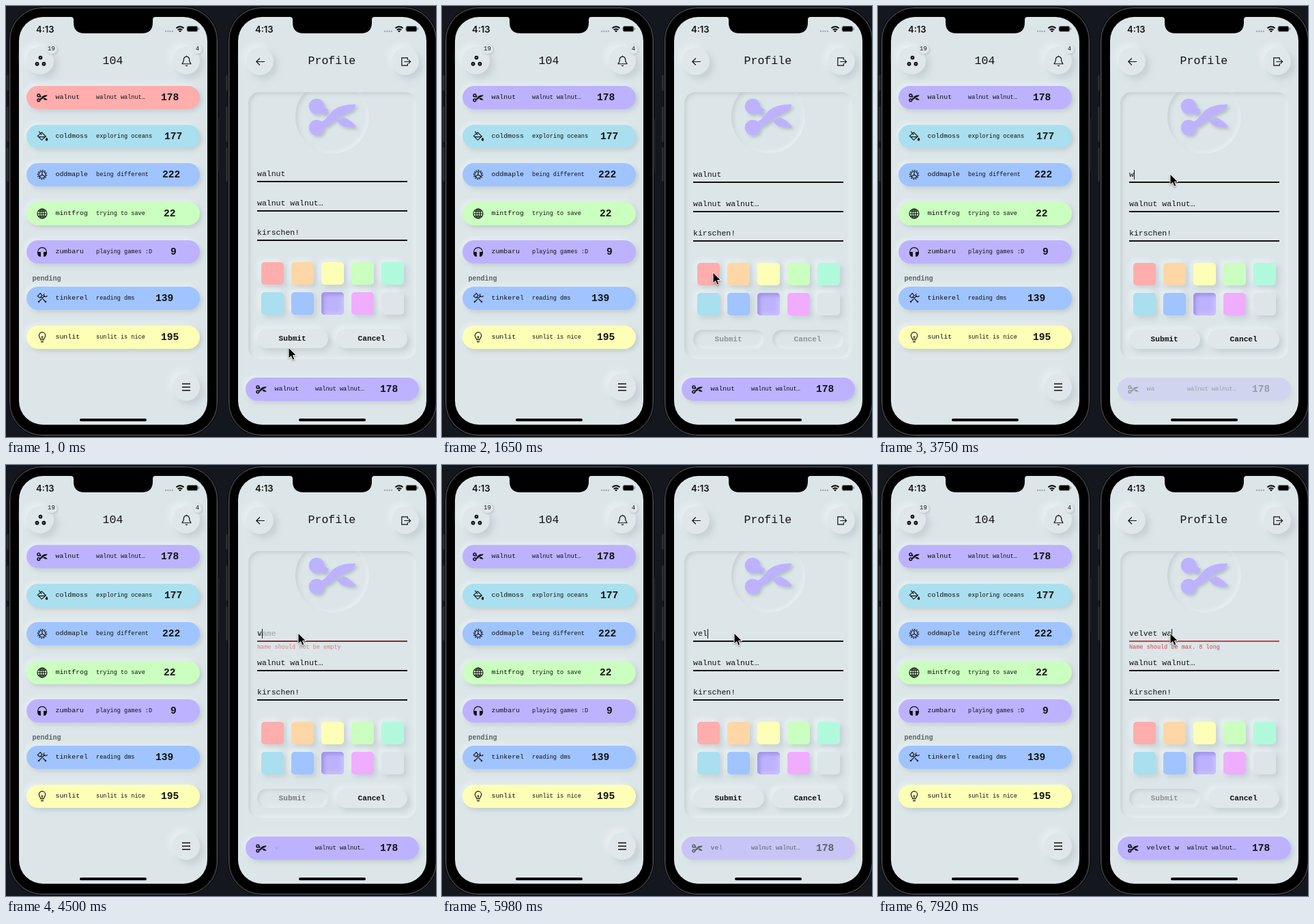
These frames come from a looping animation (630x631 px, 8 s). An HTML page:

```html
<!DOCTYPE html>
<html lang="en">
<head>
<meta charset="utf-8">
<style>
html, body { margin: 0; width: 100%; height: 100%; overflow: hidden; background: #15171e; }
div, svg { position: absolute; box-sizing: border-box; }
svg { overflow: visible; }
#stage { width: 630px; height: 631px; overflow: hidden; color: #111; font-family: "Liberation Mono", monospace; }
.text { line-height: 20px; white-space: pre; }
.raised { background: #dfe7ea; box-shadow: 4px 4px 7px #bac6caaa, -4px -4px 7px #e9f0f2; }
.round { border-radius: 50%; background: #dfe7ea; box-shadow: 6px 6px 9px #bcc8ccaa, -6px -6px 9px #e7eef0; }
.sunk { box-shadow: inset 3px 3px 5px #c0cbcfbb, inset -3px -3px 5px #e8eff1; }
.pill { box-shadow: 3px 3px 6px #b3c0c5aa, -3px -3px 6px #e9f0f2; }
.group { left: 0; top: 0; }
</style>
</head>
<body>
<div id="stage"></div>
<script>
const stage = document.getElementById('stage');
const SURFACE = '#dce5e8', LILAC = [189, 178, 255], ROSE = [255, 173, 173];
const LOOP = 8000, RIGHT = 321;
const rgb = c => `rgb(${c})`;

function box(parent, x, y, w, h, css = '', cls = '') {
  const e = document.createElement('div');
  e.className = cls;
  e.style.cssText = `left:${x}px;top:${y}px;width:${w}px;height:${h}px;${css}`;
  parent.append(e);
  return e;
}

function text(parent, str, x, y, size, css = '') {
  const e = document.createElement('div');
  e.className = 'text';
  e.style.cssText = `left:${x}px;top:${y - 10}px;font-size:${size}px;${css}`;
  e.textContent = str;
  parent.append(e);
  return e;
}

function svg(parent, x, y, w, h, view, body, css = '') {
  parent.insertAdjacentHTML('beforeend',
    `<svg viewBox="${view}" style="left:${x}px;top:${y}px;width:${w}px;height:${h}px;${css}">${body}</svg>`);
  return parent.lastChild;
}

function group(parent) {
  const e = document.createElement('div');
  e.className = 'group';
  parent.append(e);
  return e;
}

const blades = `<path d="M19 36C26 33 30 27 35 21 42 13 56 10 70 10 70 17 62 21 54 24 46 28 42 32 37 36 32 40 26 43 20 44Z
  M20 12 31 18 26 26 17 22ZM42 34 53 29C60 32 67 37 71 43 62 45 54 43 48 40Z"/>`;
const handles = attrs => [13, 44].map(y => `<circle cx="13" cy="${y}" ${attrs}/>`).join('');

const icons = {
  back: '<path d="M21 12H4m7-7-7 7 7 7"/>',
  exit: '<path d="M16 8V4H4v16h12v-4M9 12h13m-4-4 4 4-4 4"/>',
  bell: '<path d="M12 3C7 3 6 7 6 11 6 15 3 16 3 18H21C21 16 18 15 18 11 18 7 17 3 12 3ZM12 1v2M10 21q2 2 4 0"/>',
  menu: '<path stroke-width="2.2" d="M3 5h18M3 12h18M3 19h18"/>',
  dots: '<g stroke-width="3"><circle cx="12" cy="5" r="2.6"/><circle cx="5" cy="18" r="2.6"/><circle cx="19" cy="18" r="2.6"/></g>',
  bucket: '<path d="M2 11 11 3 20 12 11 20ZM5 1l6 8M4 13h15"/><path fill="#111" d="M22 15q-4 5 0 6 3-1 0-6"/>',
  gear: '<circle cx="12" cy="12" r="7.5"/><circle cx="12" cy="12" r="10" stroke-dasharray="2.6 2.6"/><path d="M12 5v7l6 4M12 12l-6 4"/>',
  globe: '<circle cx="12" cy="12" r="10.5"/><ellipse cx="12" cy="12" rx="5" ry="10.5"/><path d="M2 12h20M4 6.5h16M4 17.5h16M12 2v20"/>',
  phones: '<path d="M2.5 15v-3a9.5 9.5 0 0 1 19 0v3"/><path fill="#111" d="M2.5 13 8 13V21.5Q2 21 2.5 13ZM21.5 13 16 13V21.5Q22 21 21.5 13Z"/>',
  tools: '<path d="M3 21 18 6M21 21 9 9M2 7 8 1 12 6 7 11ZM17 2q-4 4 0 6 5 2 6-2M3 18l3 3M18 21l3-3"/>',
  bulb: '<path d="M9 18C9 14 5 13 5 8A7 7 0 0 1 19 8C19 13 15 14 15 18ZM9 22h6M10 11h4m-2 0v6"/>'
};

function icon(parent, name, cx, cy, size) {
  if (name === 'scissors')
    return svg(parent, cx - 8, cy - 6, 16, 12.5, '0 0 72 56',
      blades + handles('r="8.5" fill="none" stroke="#111" stroke-width="7"'), 'fill:#111');
  return svg(parent, cx - size / 2, cy - size / 2, size, size, '0 0 24 24', icons[name],
    'fill:none;stroke:#111;stroke-width:1.7');
}

function phone(dx) {
  const metal = 'background:#2b2d32;border-radius:2px';
  [[101, 23], [147, 52], [207, 50]].forEach(([y, h]) => box(stage, dx + 1, y, 5, h, metal));
  box(stage, dx + 308, 164, 4, 81, metal);
  box(stage, dx + 5, 2, 305, 627,
    'background:#000;border:1.5px solid #55575b;border-radius:48px;box-shadow:0 0 0 1px #08090b,inset 0 0 0 1px #1c1d20');
  box(stage, dx + 19, 16, 276, 597, `background:${SURFACE};border-radius:35px`);
  // Notch with flared top corners
  svg(stage, dx + 95, 15, 124, 25, '0 0 124 25',
    '<path d="M0 0V1Q4 1 4 5V9Q4 25 20 25H104Q120 25 120 9V5Q120 1 124 1V0Z"/>');
  text(stage, '4:13', dx + 44, 33.5, 13, 'font-family:Inter,sans-serif;font-weight:600');
  svg(stage, dx + 232, 27, 52, 13, '0 0 52 13',
    [2, 5.3, 8.6, 11.9].map(x => `<circle cx="${x}" cy="10" r="1.2" fill="#a5adb0"/>`).join('') +
    `<path d="M17.5 5.5q5.500-4.500 11 0M19.700 8q3.300-2.600 6.600 0" fill="none" stroke="#000" stroke-width="1.9"/>
     <path d="M20.900 9.300q2.100-1.300 4.200 0L23 11.400Z"/>
     <rect x="33" y="2.5" width="16" height="8" rx="2.5" fill="#000" stroke="#8b9396"/>
     <path d="M50.500 5v3" stroke="#8b9396" stroke-width="1.3"/>`);
  box(stage, dx + 108, 603.5, 98, 4, 'background:#000;border-radius:2px');
}

function roundButton(cx, cy, name, size, badge) {
  box(stage, cx - 20, cy - 20, 40, 40, '', 'round');
  icon(stage, name, cx, cy, size);
  if (!badge) return;
  const w = badge.length * 4 + 8;
  box(stage, cx + 17 - w / 2, cy - 23.5, w, 13, 'border-radius:7px;background:#dfe7ea;box-shadow:1px 1px 3px #b3bec3');
  text(stage, badge, cx + 16.5 - badge.length * 2.7, cy - 17, 9);
}

function row(x, y, color, iconName, name, bio, count, countX) {
  const pill = box(stage, x, y, 254, 34, `border-radius:17px;background:${color}`, 'pill');
  icon(pill, iconName, 23, 17, 16);
  pill.nameLabel = text(pill, name, 42.5, 17, 9.9);
  text(pill, bio, 102, 17, 8.55);
  text(pill, count, countX, 17, 14.6, 'font-weight:bold');
  return pill;
}

function button(parent, x, str) {
  const up = box(parent, x, 474, 104, 28, 'border-radius:14px', 'raised');
  const down = box(parent, x, 474, 104, 28, 'border-radius:14px', 'sunk');
  const label = text(parent, str, x + 31.5, 488, 11.2, 'font-weight:bold');
  return off => {
    up.style.opacity = 1 - off;
    down.style.opacity = off;
    label.style.opacity = 1 - off * 0.62;
  };
}

function field(parent, str, y) {
  const label = text(parent, str, 368, y, 11.5);
  const line = box(parent, 368, y + 10.5, 220, 1.9, 'background:#111');
  return { label, line };
}

phone(0);
phone(RIGHT);

// Left screen
text(stage, '104', 141.5, 80.5, 16.6);
roundButton(50, 80, 'dots', 17, '19');
roundButton(264, 80, 'bell', 17, '4');
roundButton(264, 558, 'menu', 16);
text(stage, 'pending', 38.5, 400, 10, 'font-weight:bold;color:#5c6366');
const [firstRow] = [
  [117, '#ffadad', 'scissors', 'walnut', 'walnut walnut…', '178', 197],
  [173.5, '#a9dfee', 'bucket', 'coldmoss', 'exploring oceans', '177', 202],
  [230, '#a0c4ff', 'gear', 'oddmaple', 'being different', '222', 199],
  [287, '#caffbf', 'globe', 'mintfrog', 'trying to save', '22', 201],
  [343, '#bdb2ff', 'phones', 'zumbaru', 'playing games :D', '9', 211],
  [411, '#a0c4ff', 'tools', 'tinkerel', 'reading dms', '139', 189],
  [468, '#fdffb6', 'bulb', 'sunlit', 'sunlit is nice', '195', 197]
].map(r => row(30, ...r));

// Right screen
text(stage, 'Profile', 442.5, 80.5, 16.6);
roundButton(372, 81, 'back', 17);
roundButton(585, 81, 'exit', 17);
const panel = box(stage, 355, 126, 246, 391, 'border-radius:16px;overflow:hidden', 'sunk');
box(panel, 69, -18, 108, 108, 'border-radius:50%', 'sunk');
svg(panel, 87, 8, 72, 56, '0 0 72 56', blades + handles('r="11.2"'),
  'fill:#bdb2ff;filter:drop-shadow(3px 3px 2px #b5c0c8)');

const nameGroup = group(stage), rest = group(stage);
const nameField = field(nameGroup, '', 246.5);
const placeholder = text(nameGroup, 'Name', 368, 246.5, 11.5, 'color:#777');
const caret = box(nameGroup, 0, 240, 1.2, 13.5, 'background:#111');
const errorLabel = text(nameGroup, '', 368, 267.5, 8.52, 'color:#d2444a;line-height:9px;padding-top:5px');
field(rest, 'walnut walnut…', 289.5);
field(rest, 'kirschen!', 332.5);
['#ffadad', '#ffd6a5', '#fdffb6', '#caffbf', '#b1f9dd', '#a9dfee', '#a0c4ff', '#bdb2ff', '#f0acff', SURFACE]
  .forEach((color, i) => {
    const swatch = box(rest, 374 + i % 5 * 44, i < 5 ? 375.5 : 419.5, 33, 33, 'border-radius:5px', 'raised');
    swatch.style.background = color;
    if (i === 7) swatch.style.boxShadow = 'inset 4px 4px 5px #a294ea, inset -4px -4px 5px #c9c0ff';
  });
const setSubmit = button(rest, 368, 'Submit'), setCancel = button(rest, 484, 'Cancel');
const preview = row(351, 544, '#bdb2ff', 'scissors', '', 'walnut walnut…', '178', 197);
const letters = [...'12345678'].map(() => preview.nameLabel.appendChild(document.createElement('span')));

const cursor = svg(stage, 0, 0, 12, 19, '0 0 12 19',
  '<path d="M0 0V16L3.7 12.5 6 18.3 8.8 17.1 6.5 11.5H11.5Z" stroke="#fff" stroke-width="1"/>',
  'filter:drop-shadow(0 1px 1px #0006)');

// Linear interpolation through [time, value] pairs
function ramp(t, ...keys) {
  const i = keys.findIndex(k => k[0] > t);
  if (i === 0) return keys[0][1];
  if (i < 0) return keys[keys.length - 1][1];
  const [[t0, a], [t1, b]] = [keys[i - 1], keys[i]];
  return a + (b - a) * (t - t0) / (t1 - t0);
}

const typing = [
  [0, 'walnut'], [2990, 'walnu'], [3140, 'waln'], [3290, 'wal'], [3440, 'wa'], [3590, 'w'], [3890, ''],
  [4450, 'v'], [5530, 've'], [5830, 'vel'], [6120, 'velv'], [6270, 'velve'], [6420, 'velvet'], [6570, 'velvet '],
  [6870, 'velvet w'], [7020, 'velvet wa'], [7160, 'velvet wal'], [7310, 'velvet waln'],
  [7760, 'velvet wal'], [7910, 'velvet wa']
];
const errors = [
  [0, 'Name should not be empty'],
  [6000, "'-' should not be at the begging or end of\nthe name"],
  [6950, 'Name should be max. 8 long']
];
const at = (list, t) => list.filter(e => e[0] <= t).pop()[1];

function render(t) {
  firstRow.style.background = rgb(ROSE.map((c, i) => ramp(t, [1080, c], [1350, LILAC[i]])));

  const shift = ramp(t, [300, -1], [900, 0]);
  const twoLines = t >= 6700 && t < 6870;
  nameGroup.style.top = shift + 'px';
  rest.style.top = shift + (twoLines ? 9 : 0) + 'px';

  const value = at(typing, t);
  nameField.label.textContent = value;
  caret.style.left = 368 + value.length * 6.9 + 'px';
  caret.style.opacity = t >= 2390 ? 1 : 0;
  placeholder.style.opacity = ramp(t, [3890, 0], [4100, 1], [4400, 1], [4650, 0]);

  const error = ramp(t, [3900, 0], [4150, 1], [4420, 1], [4640, 0], [6680, 0], [6860, 0.9], [6950, 0], [7020, 0], [7250, 1]);
  errorLabel.textContent = at(errors, t);
  errorLabel.style.opacity = error;
  errorLabel.style.marginTop = twoLines ? (error - 1) * 4 + 'px' : 0;
  const lineRed = twoLines ? 0 : error;
  nameField.line.style.background = rgb([17 + 190 * lineRed, 17 + 45 * lineRed, 17 + 45 * lineRed]);

  setSubmit(ramp(t, [700, 0], [1200, 1], [2950, 1], [3150, 0], [3900, 0], [4150, 1], [4450, 1], [4750, 0], [7020, 0], [7250, 1]));
  setCancel(ramp(t, [700, 0], [1200, 1], [2950, 1], [3150, 0]));

  preview.style.opacity = ramp(t, [2950, 1], [3750, 0.33], [3900, 0.33], [4350, 1], [4980, 1], [5250, 0.62], [6750, 0.62], [7200, 1]);
  const shown = ramp(t, [2990, 6], [3700, 2], [3800, 1.8], [4050, 0], [4450, 0], [4780, 1],
    [5540, 1], [5980, 2.6], [6580, 6], [6900, 6], [7180, 8]);
  const word = t < 4300 ? 'walnut' : 'velvet w';
  letters.forEach((span, i) => {
    span.textContent = word[i] || '';
    span.style.opacity = Math.min(1, Math.max(0, shown - i));
  });

  cursor.style.left = ramp(t, [1200, 413.5], [1600, 396.5], [1720, 396.5], [2060, 427.5]) + 'px';
  cursor.style.top = ramp(t, [1200, 500], [1600, 389.5], [1720, 389.5], [2060, 245.5]) + 'px';
}

function tick(now) {
  render(now % LOOP);
  requestAnimationFrame(tick);
}
requestAnimationFrame(tick);
</script>
</body>
</html>
```
